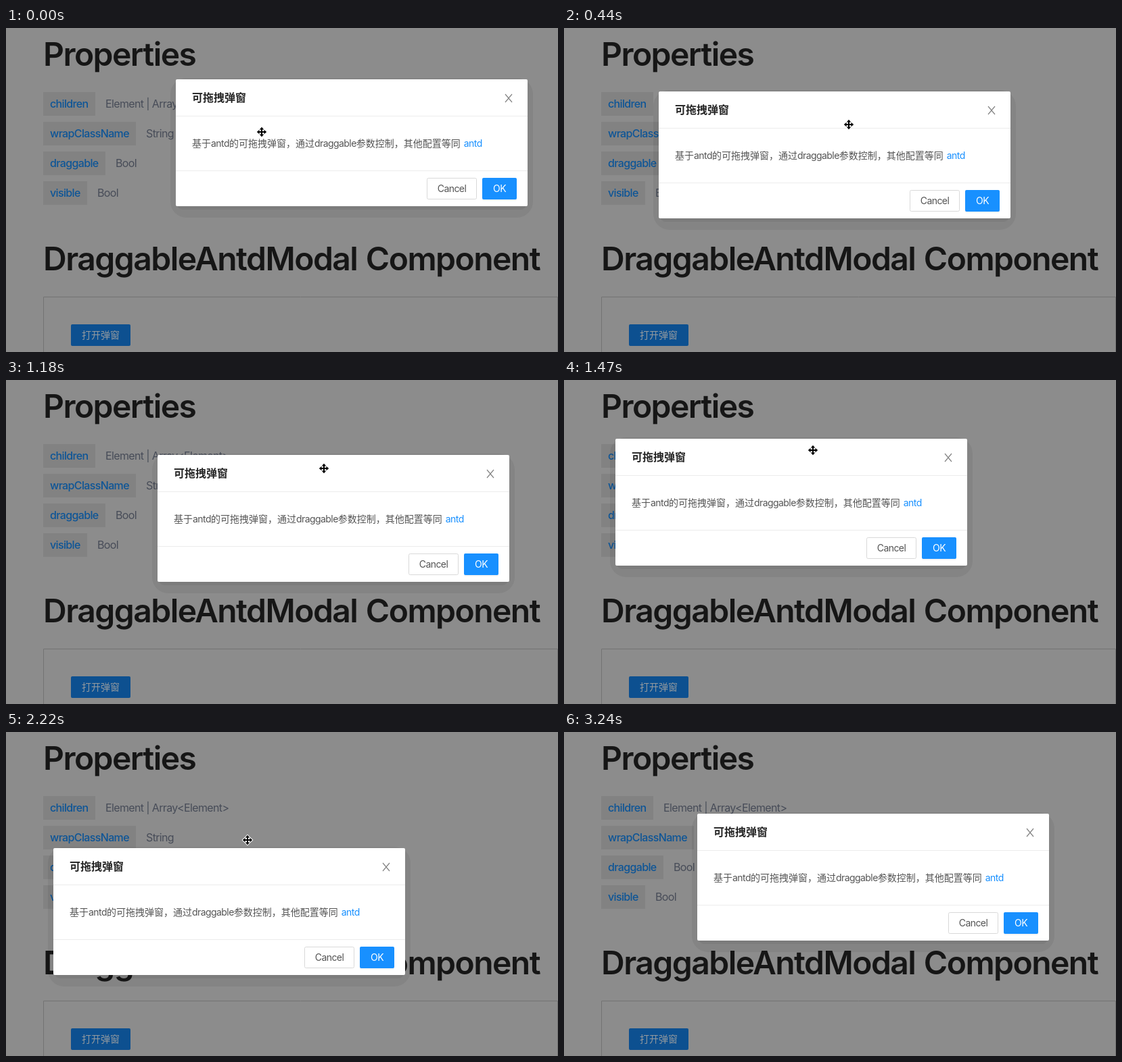
An HTML page with a canvas that plays this animation: 816x480 px, repeating every 3970 ms.

```html
<!DOCTYPE html>
<html lang="zh-CN">
<head>
<meta charset="utf-8">
<title>Draggable modal</title>
<style>
  html, body { margin: 0; width: 100%; height: 100%; overflow: hidden; background: #8c8c8c; }
  canvas { display: block; }
</style>
</head>
<body>
<canvas id="stage" width="816" height="480"></canvas>
<script>
const ctx = document.getElementById('stage').getContext('2d');
const LOOP = 3970;
const STEP = 147.2;
const LATIN = 'Inter, "Open Sans", sans-serif';
const CJK = '"Noto Sans CJK SC", "Noto Sans CJK JP", sans-serif';
const BLUE = '#1890ff';
const INK = '#545454';

// Modal corner along the drag, one point per step; the pointer then leaves.
const path = [
  [251, 76], [17, 161], [-12, 141], [140, 94], [161, 154], [154, 150], [142, 108],
  [206, 97], [224, 111], [113, 117], [76, 87], [142, 69], [198, 96], [194, 161],
  [102, 200], [70, 172], [120, 109], [194, 119], [197, 121]
];
const exit = [[508, 177], [650, 378], [720, 466]];
const grip = [280, 20];
const lead = [0.0028, 0.008];

const props = {
  children: 'Element | Array<Element>',
  wrapClassName: 'String',
  draggable: 'Bool',
  visible: 'Bool'
};

function rect(x, y, w, h, color, r = 0) {
  ctx.fillStyle = color;
  ctx.beginPath();
  ctx.roundRect(x, y, w, h, r);
  ctx.fill();
}

function frame(x, y, w, h, color, r = 0) {
  ctx.strokeStyle = color;
  ctx.lineWidth = 1;
  ctx.beginPath();
  ctx.roundRect(x + 0.5, y + 0.5, w - 1, h - 1, r);
  ctx.stroke();
}

// Draws one run and returns the x where the next one starts.
function text(str, x, y, size, color, { weight = 400, align = 'left', track = -0.04, gap = 0 } = {}) {
  const cjk = /[^\x00-\x7f]/.test(str);
  ctx.font = `${weight} ${size}px ${cjk ? CJK : LATIN}`;
  ctx.letterSpacing = `${cjk ? 0 : track * size}px`;
  ctx.wordSpacing = `${gap * size}px`;
  ctx.textAlign = align;
  ctx.fillStyle = color;
  ctx.fillText(str, x, y);
  return x + ctx.measureText(str).width;
}

function heading(str, y) {
  text(str, 55, y, 48, '#161616', { weight: 600, track: -0.032, gap: 0.04 });
}

function page() {
  rect(0, 0, 816, 480, '#8c8c8c');
  heading('Properties', 56);
  Object.entries(props).forEach(([name, type], i) => {
    const y = 95 + i * 44;
    const label = () => text(name, 65, y + 23, 16, '#0d5597', { weight: 500 });
    const right = Math.round(label()) + 10;
    rect(55, y, right - 55, 35, '#828282');
    label();
    text(type, right + 15, y + 23, 16, '#474c58');
  });
  heading('DraggableAntdModal Component', 359);
  frame(55, 398, 761, 120, '#737373');
  rect(96, 439, 88, 32, '#0d5090', 2);
  text('打开弹窗', 140, 460, 14, '#949a9f', { align: 'center' });
}

function modal(x, y) {
  rect(x - 8, y - 2, 536, 207, 'rgba(0,0,0,.06)', 24);
  rect(x + 2, y + 6, 516, 187, 'rgba(0,0,0,.06)', 8);
  rect(x, y, 520, 188, '#fff', 2);
  for (const row of [54, 135]) rect(x, y + row, 520, 1, '#ececec');

  text('可拖拽弹窗', x + 24, y + 33, 16, '#262626', { weight: 600 });
  ctx.strokeStyle = '#858585';
  ctx.lineWidth = 1.2;
  ctx.beginPath();
  for (const s of [-1, 1]) {
    ctx.moveTo(x + 492 - 5 * s, y + 22);
    ctx.lineTo(x + 492 + 5 * s, y + 34);
  }
  ctx.stroke();

  let end = x + 24;
  for (const run of ['基于', 'antd', '的可拖拽弹窗，通过', 'draggable', '参数控制，其他配置等同']) {
    end = text(run, end, y + 100, 14, INK);
  }
  text('antd', end + 5, y + 100, 14, BLUE);

  frame(x + 371, y + 146, 74, 32, '#d9d9d9', 2);
  text('Cancel', x + 408, y + 167, 14, INK, { align: 'center' });
  rect(x + 453, y + 148, 51, 32, 'rgba(0,0,0,.045)', 2);
  rect(x + 453, y + 146, 51, 32, BLUE, 2);
  text('OK', x + 478.5, y + 167, 14, '#fff', { align: 'center' });
}

function shape(points, [x, y]) {
  ctx.beginPath();
  points.forEach(([px, py]) => ctx.lineTo(x + px, y + py));
  ctx.closePath();
  ctx.lineJoin = 'round';
  ctx.lineWidth = 2;
  ctx.strokeStyle = '#fff';
  ctx.stroke();
  ctx.fillStyle = '#000';
  ctx.fill();
}

const arm = [[-1, -1], [-1, -3.5], [-3.3, -3.5], [0, -7.2], [3.3, -3.5], [1, -3.5]];
const moveCursor = [0, 1, 2, 3].flatMap(q => arm.map(([x, y]) =>
  [[x, y], [-y, x], [-x, -y], [y, -x]][q]));
const arrowCursor = [[1, 1], [1, 15], [4.2, 12], [6.4, 17], [8.6, 16], [6.5, 11.2], [11, 11]];

// While dragging, the pointer runs ahead of the modal, more so when fast.
function pointer(step) {
  if (step >= path.length) return exit[step - path.length];
  const here = path[step];
  const next = path[step + 1] || here;
  return here.map((v, i) => {
    const d = next[i] - v;
    return Math.round(v + grip[i] + lead[i] * d * Math.abs(d));
  });
}

function draw(t) {
  const step = Math.floor((t % LOOP + 5) / STEP);
  const at = pointer(step);
  page();
  modal(...path[Math.min(step, path.length - 1)]);
  if (at) shape(step > path.length ? arrowCursor : moveCursor, at);
}

const t0 = performance.now();
function tick() {
  draw(performance.now() - t0);
  requestAnimationFrame(tick);
}
tick();
</script>
</body>
</html>
```
